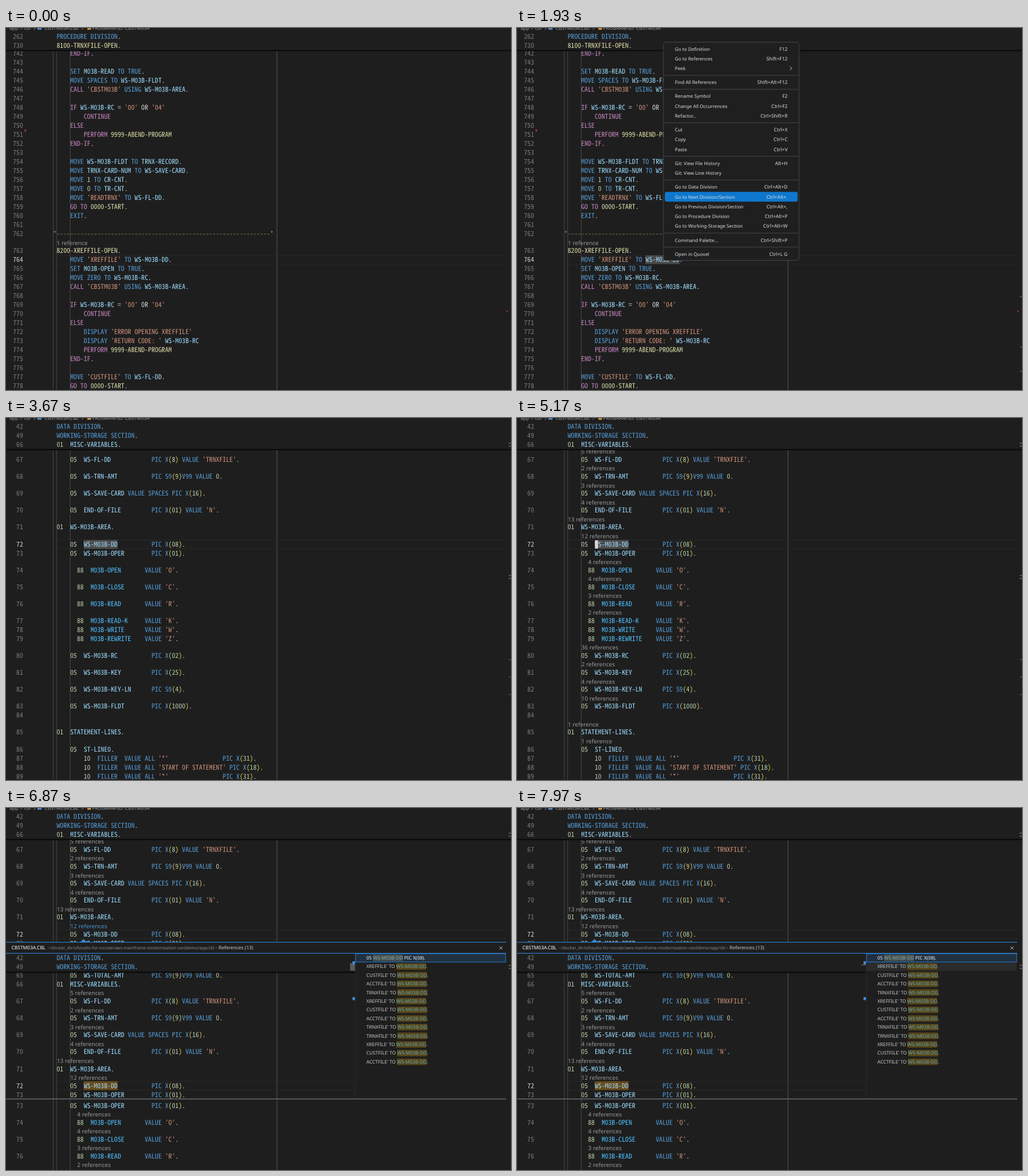
These frames come from a looping animation (838 px wide and 602 px high, 8 s). An HTML page:

```html
<!DOCTYPE html>
<html lang="en">
<head>
<meta charset="utf-8">
<title>Code editor</title>
<style>
  html, body { margin: 0; width: 100%; height: 100%; overflow: hidden; background: #1e1e1e; }
  svg { display: block; width: 838px; height: 602px; }
  text { white-space: pre; text-rendering: geometricPrecision; }
  .ui { font-family: "Noto Sans", "Open Sans", sans-serif; }
</style>
</head>
<body>
<svg id="stage" viewBox="0 0 838 602"></svg>
<script>
const LOOP = 8000, COL = 5.625, LEFT = 44.6, ROW = 15, LENS = 13.1, BG = '#1e1e1e';
const MONO = '"Noto Sans Mono CJK JP","Noto Sans Mono CJK SC","Noto Sans Mono CJK KR","Noto Sans Mono",monospace';
const colX = c => LEFT + c * COL;

// Font size that gives the editor's column advance
const pen = document.createElement('canvas').getContext('2d');
pen.font = '100px ' + MONO;
const CODE_SIZE = COL * 1000 / pen.measureText('0'.repeat(10)).width;

const KEYWORDS = new Set(('MOVE TO SET TRUE SPACES ZERO USING DISPLAY EXIT PIC X S9 V99 VALUE ALL FILLER ' +
  'PROCEDURE DATA DIVISION SECTION WORKING-STORAGE').split(' '));
const CONTROL = new Set(['IF', 'ELSE', 'CONTINUE', 'END-IF', 'PERFORM', 'GO TO', 'CALL']);

const PROCEDURE = `    END-IF.

    SET M03B-READ TO TRUE.
    MOVE SPACES TO WS-M03B-FLDT.
    CALL 'CBSTM03B' USING WS-M03B-AREA.

    IF WS-M03B-RC = '00' OR '04'
        CONTINUE
    ELSE
        PERFORM 9999-ABEND-PROGRAM
    END-IF.

    MOVE WS-M03B-FLDT TO TRNX-RECORD.
    MOVE TRNX-CARD-NUM TO WS-SAVE-CARD.
    MOVE 1 TO CR-CNT.
    MOVE 0 TO TR-CNT.
    MOVE 'READTRNX' TO WS-FL-DD.
    GO TO 0000-START.
    EXIT.

*${'-'.repeat(63)}*
^1 reference
8200-XREFFILE-OPEN.
    MOVE 'XREFFILE' TO WS-M03B-DD.
    SET M03B-OPEN TO TRUE.
    MOVE ZERO TO WS-M03B-RC.
    CALL 'CBSTM03B' USING WS-M03B-AREA.

    IF WS-M03B-RC = '00' OR '04'
        CONTINUE
    ELSE
        DISPLAY 'ERROR OPENING XREFFILE'
        DISPLAY 'RETURN CODE: ' WS-M03B-RC
        PERFORM 9999-ABEND-PROGRAM
    END-IF.

    MOVE 'CUSTFILE' TO WS-FL-DD.
    GO TO 0000-START.`.split('\n');

const VARIABLES = `    ^5 references
    05  WS-FL-DD            PIC X(8) VALUE 'TRNXFILE'.
    ^2 references
    05  WS-TRN-AMT          PIC S9(9)V99 VALUE 0.
    ^3 references
    05  WS-SAVE-CARD VALUE SPACES PIC X(16).
    ^4 references
    05  END-OF-FILE         PIC X(01) VALUE 'N'.
^13 references
01  WS-M03B-AREA.
    ^12 references
    05  WS-M03B-DD          PIC X(08).`.split('\n');

const FIELDS = `    05  WS-M03B-OPER        PIC X(01).
      ^4 references
      88  M03B-OPEN       VALUE 'O'.
      ^4 references
      88  M03B-CLOSE      VALUE 'C'.
      ^3 references
      88  M03B-READ       VALUE 'R'.
      ^2 references
      88  M03B-READ-K     VALUE 'K'.
      88  M03B-WRITE      VALUE 'W'.
      88  M03B-REWRITE    VALUE 'Z'.
    ^36 references
    05  WS-M03B-RC          PIC X(02).
    ^2 references
    05  WS-M03B-KEY         PIC X(25).
    ^4 references
    05  WS-M03B-KEY-LN      PIC S9(4).
    ^10 references
    05  WS-M03B-FLDT        PIC X(1000).

^1 reference
01  STATEMENT-LINES.
    ^1 reference
    05  ST-LINE0.
        10  FILLER  VALUE ALL '*'                PIC X(31).
        10  FILLER  VALUE ALL 'START OF STATEMENT' PIC X(18).
        10  FILLER  VALUE ALL '*'                PIC X(31).`.split('\n');

const MENU = `Go to Definition|F12
Go to References|Shift+F12
Peek|

Find All References|Shift+Alt+F12

Rename Symbol|F2
Change All Occurrences|Ctrl+F2
Refactor...|Ctrl+Shift+R

Cut|Ctrl+X
Copy|Ctrl+C
Paste|Ctrl+V

Git: View File History|Alt+H
Git: View Line History|

Go to Data Division|Ctrl+Alt+D
Go to Next Division/Section|Ctrl+Alt+.
Go to Previous Division/Section|Ctrl+Alt+,
Go to Procedure Division|Ctrl+Alt+P
Go to Working-Storage Section|Ctrl+Alt+W

Command Palette...|Ctrl+Shift+P

Open in Quovel|Ctrl+L G`.split('\n');

function add(parent, tag, attrs = {}, text) {
  const el = document.createElementNS('http://www.w3.org/2000/svg', tag);
  for (const k in attrs) el.setAttribute(k, attrs[k]);
  if (text !== undefined) el.textContent = text;
  return parent.appendChild(el);
}
const group = (parent, attrs) => add(parent, 'g', attrs);
const box = (p, x, y, width, height, fill, more) => add(p, 'rect', { x, y, width, height, fill, ...more });
const path = (p, d, stroke, more) => add(p, 'path', { d, stroke, fill: 'none', ...more });
const label = (p, x, y, text, size, fill, more) =>
  add(p, 'text', { class: 'ui', x, y, 'font-size': size, fill, ...more }, text);

function colorOf(word, line) {
  if (word[0] === "'") return '#ce9178';
  if (CONTROL.has(word)) return '#c586c0';
  if (KEYWORDS.has(word)) return '#569cd6';
  if (/^\d{4}-/.test(word)) return '#dcdcaa';
  if (/^\d+$/.test(word)) return '#b5cea8';
  if (/[()]/.test(word)) return '#e8cc50';
  if (/^\s*88/.test(line) && /^M03B/.test(word)) return '#4fc1ff';
  return word.includes('-') ? '#9cdcfe' : '#d4d4d4';
}

function codeRow(p, y, number, line, active) {
  const font = { 'font-family': MONO, 'font-size': CODE_SIZE };
  add(p, 'text', { ...font, x: 28.3, y: y + 4, 'text-anchor': 'end', fill: active ? '#d0d0d0' : '#777b80' }, number);
  const text = add(p, 'text', { ...font, y: y + 4 });
  if (line[0] === '*') {
    add(text, 'tspan', { x: colX(6), fill: '#6a9955' }, line);
    return;
  }
  for (const m of line.matchAll(/'[^']*'|GO TO|[A-Z0-9][A-Z0-9-]*|[().=]/g))
    add(text, 'tspan', { x: colX(7 + m.index), fill: colorOf(m[0], line) }, m[0]);
}

// Lines holding "^" are reference counts above the next line of code
function codeRows(p, lenses, y, number, lines, active) {
  for (const line of lines) {
    const mark = line.indexOf('^');
    if (mark >= 0) {
      label(lenses, colX(7 + mark) + .3, y + 3.4, line.slice(mark + 1), 9.65, '#999');
      y += LENS;
    } else {
      codeRow(p, y, number, line, number === active);
      number++;
      y += ROW;
    }
  }
  return y;
}

const rulers = (p, top, bottom) => [6, 7, 11, 72].forEach(c =>
  box(p, colX(c) - .5, top, 1, bottom - top, c === 72 ? '#555' : '#484848'));

function activeLine(p, y, right) {
  box(p, 78, y - 7.5, right - 78, 1, '#292929');
  box(p, 78, y + 7, right - 78, 1, '#292929');
}

function sticky(p, y, rows, right) {
  const bottom = y + rows.length * ROW - 6;
  box(p, 0, y - 8, right, bottom - y + 8, BG);
  box(p, 0, bottom - 1, right, 2, '#080808');
  rows.forEach(([n, line], i) => codeRow(p, y + i * ROW, n, line));
}

const marks = (p, ys, fill) => ys.forEach(y => box(p, 834, y, 4, 1.5, fill));

const stage = document.getElementById('stage');
box(stage, 0, 0, 838, 602, BG);

// Procedure view
const procedure = group(stage);
rulers(procedure, 38, 602);
activeLine(procedure, 385.3, 830);
const word = group(procedure);
box(word, colX(30), 378, 10 * COL, 14.5, '#4a4a4a');
marks(word, [446, 530, 570], '#505050');
codeRows(procedure, procedure, 42.2, 742, PROCEDURE, 764);
sticky(procedure, 13.5, [[262, 'PROCEDURE DIVISION.'], [730, '8100-TRNXFILE-OPEN.']], 838);
add(procedure, 'path', { d: 'M31 168l3 2.5-3 2.5z', fill: '#b04040' });
box(procedure, 830, 470, 3, 2, '#8a3030');

// Data view
const data = group(stage);
rulers(data, 52, 602);
activeLine(data, 209.7, 830);
const found = box(data, colX(15), 203, 10 * COL, 14.5, '#4d4d4d');
const lenses = group(data);
const next = codeRows(data, lenses, 55.9, 67, VARIABLES, 72);
codeRows(data, lenses, next, 73, FIELDS);
const hotLens = [...lenses.children].find(t => t.textContent === '12 references');
const caret = box(data, 129.5, 203.5, 5, 13.5, '#d8d8d8');
sticky(data, 13.5, [[42, 'DATA DIVISION.'], [49, 'WORKING-STORAGE SECTION.'], [66, '01  MISC-VARIABLES.']], 838);
marks(data, [41, 46, 261, 266], '#606060');
const lowMarks = group(data);
marks(lowMarks, [401, 430, 459], '#484848');

// Reference panel
const peek = group(stage);
box(peek, 0, 223, 838, 379, BG);
rulers(peek, 485, 602);
codeRows(peek, peek, 494.5, 73, FIELDS.slice(0, 8));
marks(peek, [261, 266], '#606060');
add(peek, 'path', { d: 'M122.5 223.5l6-5.5 6 5.5z', fill: '#3a8ad8' });
label(peek, 9, 235.4, 'CBSTM03A.CBL', 8, '#fff');
label(peek, 69, 235.2, '~/docker_dir/ofstudio-for-vscode/aws-mainframe-modernization-carddemo/app/cbl', 7.05, '#8c8c8c');
label(peek, 348, 235.4, '- References (13)', 8, '#ccc');
path(peek, 'M818.8 230.3l5 5m0-5l-5 5', '#ccc');

const content = group(peek);
const clip = add(add(stage, 'defs'), 'clipPath', { id: 'inner' });
box(clip, 0, 242, 580, 241.5, '#fff');
const inner = group(content, { 'clip-path': 'url(#inner)' });
rulers(inner, 273, 484);
activeLine(inner, 461.6, 579);
box(inner, colX(15), 454.5, 10 * COL, 14.5, '#684a1a');
codeRows(inner, inner, 278, 65, ['    05  WS-TOTAL-AMT        PIC S9(9)V99 VALUE 0.', '01  MISC-VARIABLES.',
  ...VARIABLES, FIELDS[0]], 72);
sticky(inner, 249.3, [[42, 'DATA DIVISION.'], [49, 'WORKING-STORAGE SECTION.']], 580);
box(inner, 571, 260.5, 8, 1, '#777');
const thumb = box(inner, 571, 258, 8, 12.5, '#5a5a5a');
box(inner, 575, 255, 4, 5, '#3a8ee0');
box(inner, 575, 314.5, 4, 5, '#3a8ee0');

box(content, 579.5, 242, 1, 242, '#2b2b2b');
const rowHover = box(content, 580, 256.5, 249, 14.4, '#2a2b2b');
box(content, 580, 242.3, 249, 13.8, '#20303f', { stroke: '#2a7bd0' });
const files = { X: 'XREFFILE', C: 'CUSTFILE', A: 'ACCTFILE', T: 'TRNXFILE' };
['05 ', ...[...'XCATXCATTXCA'].map(k => files[k] + "' TO ")].forEach((prefix, i) => {
  const y = 249.2 + i * 14.4, first = i === 0;
  const put = (x, s, fill) => label(content, x, y + 2.8, s, 7.9, fill);
  const plain = first ? '#fff' : '#ccc';
  let x = 598 + put(598, prefix, plain).getComputedTextLength();
  const mark = box(content, x, y - 5.4, 0, 10.8, first ? '#45524f' : '#574518');
  const width = put(x, 'WS-M03B-DD', first ? '#8fa8a4' : '#62a8b8').getComputedTextLength();
  mark.setAttribute('width', width);
  put(x + width, first ? ' PIC X(08).' : '.', plain);
});
box(peek, 0, 222.7, 830, 1.2, '#3079c4');
box(peek, 0, 241, 830, 1.2, '#3079c4');
box(peek, 0, 483.3, 830, 1.1, '#7c848c');

// Context menu
const menu = group(stage);
box(menu, 243, 23.5, 225, 363, '#1f1f1f', { rx: 4, stroke: '#454545' });
const choice = box(menu, 245.3, 26.5, 220.4, 16.3, '#0e78cf', { rx: 3 });
const itemYs = [];
let menuY = 34.7;
for (const item of MENU) {
  if (!item) {
    box(menu, 243, menuY - 5.2, 225, 1, '#454545');
    menuY += 6.9;
    continue;
  }
  const [name, keys] = item.split('|');
  label(menu, 262, menuY + 2.9, name, 7.8, '#dedede');
  label(menu, 449, menuY + 2.9, keys, 8.1, '#dedede', { 'text-anchor': 'end' });
  if (name === 'Peek') path(menu, `M453 ${menuY - 3}l3 3-3 3`, '#ccc');
  itemYs.push(menuY);
  menuY += 16.27;
}

// Breadcrumbs, cut by the top edge
const crumbs = group(stage);
[[6, 'app'], [30, 'cbl'], [64, 'CBSTM03A.CBL'], [143, 'PROGRAM-ID: CBSTM03A']]
  .forEach(([x, s]) => label(crumbs, x, 3, s, 8, '#a0a0a0'));
[23.5, 46, 125.5].forEach(x => path(crumbs, `M${x} -3l3 3-3 3`, '#888'));
box(crumbs, 52, -3, 7, 6, '#4a7fb5');
box(crumbs, 135, -3, 6, 6, '#c98a3a');

const progress = (t, a, b) => Math.min(1, Math.max(0, (t - a) / (b - a)));
const ease = p => p * p * (3 - 2 * p);
const show = (el, on) => el.style.display = on ? '' : 'none';

function draw(t) {
  show(procedure, t < 3170);
  show(word, t >= 1670);
  show(menu, t >= 1400 && t < 3170);
  const mouseY = 383 - 349 * ease(progress(t, 1670, 2370));
  const hover = itemYs.find(y => Math.abs(y - mouseY) <= 8.2);
  show(choice, t >= 1670 && hover !== undefined);
  if (hover !== undefined) choice.setAttribute('y', hover - 8.15);

  show(data, t >= 3170);
  show(lenses, t >= 3770);
  show(found, t < 6500);
  show(lowMarks, t < 6500);
  caret.style.opacity = t < 5670 ? ease(progress(t, 4630, 5170)) : 0;
  hotLens.setAttribute('fill', t >= 6130 && t < 7070 ? '#4e94ce' : '#999');

  show(peek, t >= 6500);
  show(content, t >= 6600);
  thumb.style.opacity = 1 - progress(t, 7070, 7870);
  show(rowHover, t >= 7870);
}

const start = performance.now();
function tick() {
  draw((performance.now() - start) % LOOP);
  requestAnimationFrame(tick);
}
tick();
</script>
</body>
</html>
```
